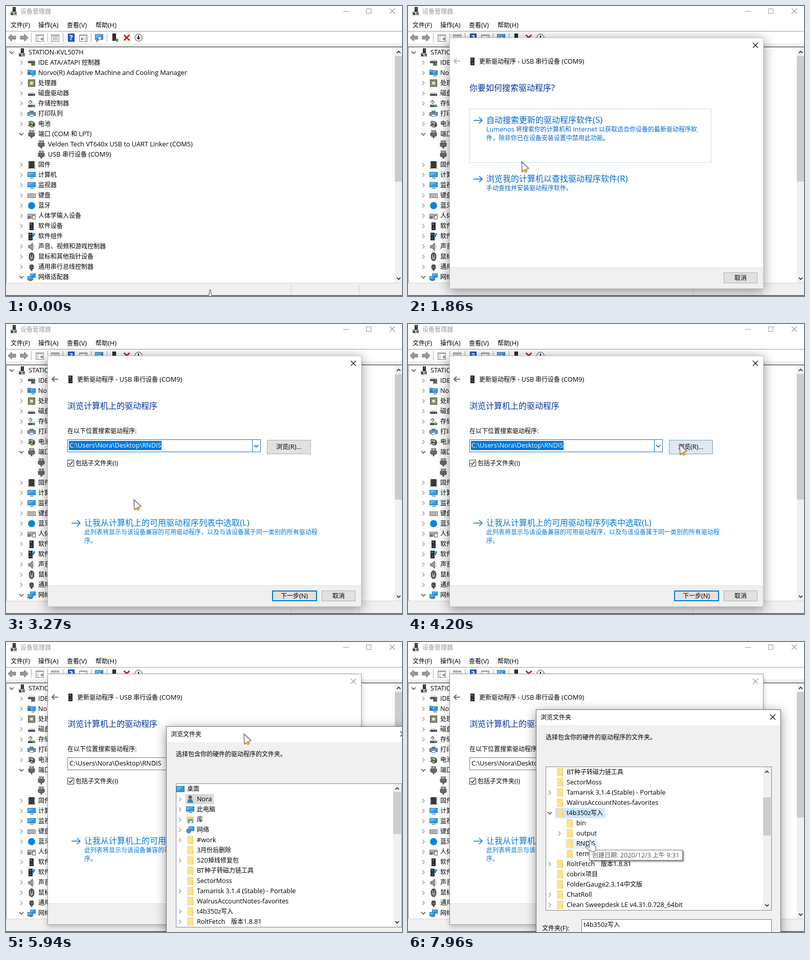
These frames come from a looping animation (774 px wide and 568 px high, 8000 ms). An HTML page with a canvas:

```html
<!DOCTYPE html>
<html lang="zh-CN">
<head>
<meta charset="utf-8">
<title>设备管理器</title>
<style>
html, body { margin: 0; width: 774px; height: 568px; overflow: hidden; background: #f0f0f0; }
canvas { display: block; }
</style>
</head>
<body>
<canvas id="c" width="774" height="568"></canvas>
<script>
const g = document.getElementById('c').getContext('2d');
const LOOP = 8000, STEP = 156.6, BLUE = '#0078d7';

// ---- drawing helpers ----
const R = (x, y, w, h, c) => { g.fillStyle = c; g.fillRect(x, y, w, h); };
const box = (x, y, w, h, fill, line) => { R(x, y, w, h, line); R(x + 1, y + 1, w - 2, h - 2, fill); };
function trace(pts) {
  g.beginPath();
  pts.forEach(([x, y], i) => i ? g.lineTo(x, y) : g.moveTo(x, y));
}
function L(pts, c, w = 1) { trace(pts); g.strokeStyle = c; g.lineWidth = w; g.stroke(); }
function P(pts, fill, line, w = 1) {
  trace(pts); g.closePath();
  g.fillStyle = fill; g.fill();
  if (line) { g.strokeStyle = line; g.lineWidth = w; g.lineJoin = 'round'; g.stroke(); }
}
function disc(x, y, r, fill, line) {
  g.beginPath(); g.arc(x, y, r, 0, 7);
  g.fillStyle = fill; g.fill();
  if (line) { g.strokeStyle = line; g.lineWidth = 1; g.stroke(); }
}
function panel(x, y, w, h, fill, line, blur, alpha, off) {
  g.save();
  g.shadowColor = `rgba(0,0,0,${alpha})`; g.shadowBlur = blur;
  g.shadowOffsetX = off; g.shadowOffsetY = off || 4;
  R(x, y, w, h, line);
  g.restore();
  R(x + 1, y + 1, w - 2, h - 2, fill);
}
// Latin runs are set a little larger than the CJK runs beside them
function run(s, size, bold, each) {
  let w = 0;
  for (const part of s.match(/[\u3000-\uffef]+|[^\u3000-\uffef]+/g)) {
    const px = part.charCodeAt(0) >= 0x3000 ? size : size * 1.06;
    g.font = `${bold ? 'bold ' : ''}${px}px "Open Sans","Noto Sans CJK SC","Noto Sans CJK",sans-serif`;
    if (each) each(part, w);
    w += g.measureText(part).width;
  }
  return w;
}
function T(s, x, y, c = '#000', size = 12, bold = false) {
  const base = Math.round(y + size * .36);
  run(s, size, bold, (part, dx) => { g.fillStyle = c; g.fillText(part, Math.round(x + dx), base); });
}
const width = s => run(s, 12, false);
const mid = (s, x, y) => T(s, x - width(s) / 2, y);
function chevron(x, y, open, c) {
  if (open) L([[x - 4, y - 2], [x, y + 2], [x + 4, y - 2]], c || '#404040', 1.5);
  else L([[x - 2, y - 4], [x + 2, y], [x - 2, y + 4]], c || '#9c9c9c', 1.4);
}
function cross(x, y, c, r = 5, w = 1.1) {
  L([[x - r, y - r], [x + r, y + r]], c, w);
  L([[x + r, y - r], [x - r, y + r]], c, w);
}
function arrow(x, y, len, c, w, head) {
  L([[x, y], [x + len, y]], c, w);
  L([[x + len - head, y - head], [x + len, y], [x + len - head, y + head]], c, w);
}
function scrollbar(x, y, h, top, len) {
  R(x, y, 16, h, '#f0f0f0');
  L([[x + 4, y + 11], [x + 7.5, y + 7.5], [x + 11, y + 11]], '#404040', 1.8);
  L([[x + 4, y + h - 11], [x + 7.5, y + h - 7.5], [x + 11, y + h - 11]], '#404040', 1.8);
  R(x, Math.round(top), 15, Math.round(len), '#cdcdcd');
}

// ---- icons, drawn around 0,0 ----
const screen = (x, y, w, h) => {
  box(x, y, w, h, '#2f9be8', '#2874b0');
  P([[x + 1, y + 1], [x + w - 2, y + 1], [x + 1, y + h - 2]], '#5bb8f5');
};
const plug = (s, c) => {
  box(-5 * s, -8 * s, 10 * s, 6 * s, '#c4c4c4', '#777');
  R(-3 * s, -6 * s, 2, 2, '#444'); R(1.4 * s, -6 * s, 2, 2, '#444');
  P([[-6.5 * s, -3], [6.5 * s, -3], [6.5 * s, 3], [4 * s, 5], [-4 * s, 5], [-6.5 * s, 3]], c);
  for (const x of [-3, 0, 3]) R(x * s - .5, -1, 1, 4, '#8d8d8d');
  R(-1.5, 5, 3, 3, '#555');
};
const drive = y => {
  P([[-5, y], [5, y], [7, y + 3], [-7, y + 3]], '#d0d3d6');
  R(-7, y + 3, 14, 4, '#4c5054'); R(3, y + 5, 2, 1, '#7fdc6a');
};
const tower = () => { box(-4, -7, 8, 15, '#303438', '#1c1e20'); R(-2, -5, 2, 2, '#6ec46a'); R(-2, 4, 4, 1, '#777'); };
const icons = {
  pc() {
    box(-2, -8, 6, 10, '#3a3c3e', '#1a1a1a'); R(0, -6, 2, 1, '#8ccf7c');
    box(-6, 1, 12, 7, '#d4d6d8', '#777'); R(-5, 3, 4, 4, '#444'); R(1, 3, 4, 3, '#555');
  },
  ide() { drive(-6); R(-1, 1, 8, 5, '#5c8a56'); R(1, 2, 3, 2, '#2d4a2a'); },
  system() { screen(-4, -5, 12, 9); R(-8, -6, 6, 10, '#3b78b8'); R(-7, -4, 4, 1, '#bfe0ff'); R(0, 5, 6, 2, '#889'); },
  cpu() { box(-7, -7, 14, 14, '#8aa06a', '#39432c'); box(-4, -4, 8, 8, '#e5e0c6', '#646a4d'); },
  disk() { drive(-2); },
  store() { drive(0); L([[-6, -2], [-2, -6], [1, -3], [-3, 0]], '#666', 1.5); R(1, 3, 6, 4, '#5c8a56'); },
  printer() { R(-4, -6, 8, 5, '#4a8ec8'); box(-8, -3, 16, 7, '#89939c', '#4d565e'); box(-4, 1, 8, 5, '#fff', '#4a8ec8'); },
  battery() { disc(1, 1, 6, '#565b50'); R(-6, -6, 8, 5, '#7e8877'); R(-2, -3, 5, 8, '#a9b59a'); L([[-7, 4], [-2, 0], [6, 4]], '#333', 1.5); },
  port() { plug(1, '#5a5a5a'); },
  chip() {
    box(-5, -7, 10, 14, '#3a3a3a', '#222');
    for (let y = -6; y < 7; y += 3) { R(-7, y, 2, 1.5, '#555'); R(5, y, 2, 1.5, '#555'); }
  },
  monitor() { screen(-8, -6, 16, 10); R(-3, 5, 7, 2, '#8a97a3'); },
  keys() {
    box(-8, -4, 16, 9, '#d5d5d5', '#6d6d6d');
    for (let y = -2; y < 3; y += 2) for (let x = -6; x < 6; x += 2) R(x, y, 1, 1, '#444');
  },
  dot() { disc(0, 0, 7, '#0a84dc'); },
  hid() { icons.keys(); R(-8, 0, 6, 6, '#777'); box(1, -1, 7, 8, '#ededed', '#666'); },
  tower,
  part() { g.save(); g.translate(-2, 0); tower(); g.restore(); R(3, -6, 4, 4, '#3a96dd'); R(1, -3, 4, 4, '#2874b0'); },
  sound() { P([[-6, -2], [-3, -2], [2, -7], [2, 8], [-3, 3], [-6, 3]], '#999', '#555'); L([[4, -4], [5, 0], [4, 5]], '#aaa'); },
  mouse() { g.beginPath(); g.ellipse(0, 0, 4.5, 7.5, 0, 0, 7); g.fillStyle = '#9a9a9a'; g.fill(); g.strokeStyle = '#222'; g.lineWidth = 1.6; g.stroke(); R(-.7, -6, 1.5, 6, '#222'); },
  usb() { plug(.65, '#3f3f3f'); },
  net() { screen(-3, -7, 11, 8); screen(-8, -2, 11, 8); R(-5, 6, 6, 1.5, '#667'); },
  desk() { screen(-8, -6, 16, 12); },
  user() { disc(0, -4, 3.5, '#6b5a48'); P([[-6, 7], [-4, 0], [4, 0], [6, 7]], '#3f7fae'); },
  lib() { R(-7, -6, 14, 12, '#f4cf67'); R(-4, -1, 9, 8, '#3f9ad8'); R(-1, 2, 4, 5, '#fff'); },
  globe() { screen(-3, -7, 11, 9); disc(-3, 2, 5, '#4a93c8'); },
  folder() { R(-6, -8, 12, 16, '#f0cf70'); R(-6, -7, 11, 15, '#fde28f'); R(5, -1, 1, 9, '#e0b850'); },
};
function icon(name, x, y) { g.save(); g.translate(x, y); icons[name](); g.restore(); }

// ---- contents ----
const tree = [
  [0, 'STATION-KVL507H', 'pc', 1], [1, 'IDE ATA/ATAPI 控制器', 'ide'],
  [1, 'Norvo(R) Adaptive Machine and Cooling Manager', 'system'],
  [1, '处理器', 'cpu'], [1, '磁盘驱动器', 'disk'], [1, '存储控制器', 'store'], [1, '打印队列', 'printer'],
  [1, '电池', 'battery'], [1, '端口 (COM 和 LPT)', 'port', 1],
  [2, 'Velden Tech VT640x USB to UART Linker (COM5)', 'port'], [2, 'USB 串行设备 (COM9)', 'port'],
  [1, '固件', 'chip'], [1, '计算机', 'monitor'], [1, '监视器', 'monitor'], [1, '键盘', 'keys'], [1, '蓝牙', 'dot'],
  [1, '人体学输入设备', 'hid'], [1, '软件设备', 'tower'], [1, '软件组件', 'part'], [1, '声音、视频和游戏控制器', 'sound'],
  [1, '鼠标和其他指针设备', 'mouse'], [1, '通用串行总线控制器', 'usb'], [1, '网络适配器', 'net', 1],
];
// a leading + marks an entry with children
const dir = s => [1, s.replace(/^\+/, ''), 'folder', s[0] === '+'];
const tail = ['+Clean Sweepdesk LE v4.31.0.728_64bit', '+kp-5300摇杆for7 8 10 程序', 'qpull'];
const folders = [
  [0, '桌面', 'desk'], [1, 'Nora', 'user', true], [1, '此电脑', 'monitor', true], [1, '库', 'lib', true], [1, '网络', 'globe', true],
  ...['+#work', '3月份后删除', '+520掉线修复包', 'BT种子转磁力链工具', 'SectorMoss', '+Tamarisk 3.1.4 (Stable) - Portable',
    'WalrusAccountNotes-favorites', '+t4b350z写入', '+RoltFetch　版本1.8.81', 'cobrix项目', 'FolderGauge2.3.14中文版',
    '+ChatRoll', ...tail, ...tail].map(dir),
];
const PICK = 12;
const inner = [[2, 'bin', 'folder'], [2, 'output', 'folder', true], [2, 'RNDIS', 'folder'], [2, 'term', 'folder']];
const opened = [...folders.slice(0, PICK + 1), ...inner, ...folders.slice(PICK + 1)];

// ---- timing ----
const path = [
  [0, 399, 556], [900, 169, 296], [1070, 176, 298], [1380, 222, 305], [2000, 222, 305], [2630, 250, 344],
  [3260, 250, 344], [4040, 531, 236], [4510, 531, 236], [5290, 465, 180], [5930, 465, 180], [6230, 402, 147],
  [6540, 353, 322], [7020, 353, 322], [7180, 353, 328], [7800, 354, 375], [7960, 355, 389],
];
function along(t) {
  let i = 1;
  while (i < path.length - 1 && path[i][0] < t) i++;
  const [a, x, y] = path[i - 1], [b, u, v] = path[i];
  let k = Math.min(1, Math.max(0, (t - a) / (b - a)));
  k = k * k * (3 - 2 * k);
  return [Math.round(x + (u - x) * k), Math.round(y + (v - y) * k)];
}
const topRow = t => t < 6500 ? 0 : t < 6650 ? 3 : t < 6800 ? 6 : t < 7100 ? 9 : 8;

// ---- parts of the scene ----
function toolbar() {
  for (const [x, d] of [[12, -1], [35, 1]])
    P([[x + 8 * d, 62], [x + d, 55], [x + d, 59], [x - 7 * d, 59], [x - 7 * d, 65], [x + d, 65], [x + d, 69]], '#9b9b9b', '#6e6e6e');
  for (const x of [49, 81, 111, 166, 197]) R(x, 53, 1, 18, '#a8a8a8');
  for (const x of [66, 96, 151]) { box(x - 8, 56, 16, 14, '#fff', '#858585'); R(x - 7, 57, 14, 2, '#b8b8b8'); }
  R(60, 60, 4, 9, '#ddd'); P([[72, 61], [72, 68], [67, 64.5]], '#4ca64c');
  for (let y = 60; y < 68; y += 2) R(91, y, 10, 1, '#999');
  R(153, 60, 5, 9, '#ddd'); P([[147, 61], [147, 68], [152, 64.5]], '#4ca64c');
  box(121, 54, 13, 16, '#2a5fc0', '#1c4590'); T('?', 124, 62, '#fff', 13, true);
  screen(174, 55, 16, 11); disc(183, 63, 3.5, '#d8f0ff', '#557'); L([[180, 66], [176, 70]], '#555', 2);
  box(208, 54, 7, 14, '#333', '#111'); P([[213, 67], [217, 63], [221, 67]], '#3fa34a'); R(215, 67, 4, 3, '#3fa34a');
  cross(236, 62, '#c02314', 5.5, 2.8);
  disc(259, 62, 7, '#fff', '#333'); R(258, 58, 2, 4, '#111'); P([[255, 62], [263, 62], [259, 66]], '#111');
}
function manager(active, selected, status) {
  R(0, 0, 774, 568, '#fff');
  const ink = active ? '#000' : '#999';
  icon('pc', 15, 10);
  T('设备管理器', 28, 11, ink);
  R(659, 10, 11, 1, ink);
  g.strokeStyle = ink; g.lineWidth = 1; g.strokeRect(704.5, 5.5, 9, 9);
  cross(755, 10, ink);
  [['文件(F)', 9], ['操作(A)', 63], ['查看(V)', 119], ['帮助(H)', 175]].forEach(([s, x]) => T(s, x, 38));
  R(0, 49, 774, 1, '#a0a0a0');
  toolbar();
  R(0, 73, 774, 6, '#f0f0f0');
  R(0, 79, 774, 1, '#a0a0a0'); R(0, 80, 774, 1, '#696969'); R(0, 80, 1, 463, '#828790');
  tree.forEach(([lv, s, ic, open], i) => {
    const x = [44, 63, 82][lv], y = 91 + i * 20;
    if (selected && i === 10) R(59, 281, 152, 19, '#cce8ff');
    if (lv < 2) chevron(lv ? 30 : 11, y, open);
    icon(ic, x - 13, y);
    T(s, x, y);
  });
  scrollbar(760, 81, 462, 98, 246);
  R(0, 542, 774, 26, '#f0f0f0'); R(0, 542, 774, 1, '#d5d5d5');
  R(557, 546, 1, 19, '#d2d2d2'); R(690, 546, 1, 19, '#d2d2d2');
  if (status) T('启动所选设备的更新驱动程序向导。', 1, 556);
  R(0, 566, 774, 1, '#a9a6a6'); R(0, 567, 774, 1, '#474242');
}
function menu(hot) {
  panel(169, 297, 203, 131, '#f0f0f0', '#a5a5a5', 3, .5, 2);
  if (hot) R(172, 300, 197, 22, '#91c9f7');
  [['更新驱动程序(P)', 311], ['禁用设备(D)', 333], ['卸载设备(U)', 355], ['扫描检测硬件改动(A)', 384]].forEach(([s, y]) => T(s, 204, y));
  T('属性(R)', 204, 413, '#000', 12, true);
  R(199, 369, 169, 1, '#c8c8c8'); R(199, 398, 169, 1, '#c8c8c8');
}
function button(s, x, y, w, h, fill = '#e1e1e1', line = '#adadad', thick) {
  box(x, y, w, h, fill, line);
  if (thick) box(x + 1, y + 1, w - 2, h - 2, fill, line);
  mid(s, x + w / 2, y + h / 2);
}
function link(title, lines, y, c) {
  arrow(128, y + 1, 17, c, 1.5, 6);
  T(title, 153, y, c, 16);
  lines.forEach((s, i) => T(s, 153, y + 19 + i * 17, c));
}
function wizard(t, page, active, mx, my) {
  panel(81, 62, 614, 492, '#fff', active ? '#c4c4c4' : '#9b9b9b', active ? 22 : 10, active ? .42 : .22, 0);
  cross(679, 77, active ? '#000' : '#999');
  const back = page ? '#666' : '#b4b4b4';
  L([[90, 108], [102, 108]], back, 1.8); L([[95, 103], [90, 108], [95, 113]], back, 1.8);
  icon('tower', 126, 108);
  T('更新驱动程序 - USB 串行设备 (COM9)', 139, 109);
  R(82, 512, 612, 41, '#f0f0f0'); R(82, 512, 612, 1, '#dfdfdf');
  button('取消', 617, 522, 66, 21);
  if (!page) {
    T('你要如何搜索驱动程序?', 120, 160, '#003399', 16);
    const hot = mx > 120 && mx < 593 && my > 316 && my < 405;
    box(120, 201, 473, 106, '#fff', '#c6dfea');
    if (hot) box(120, 316, 473, 89, '#fff', '#dedede');
    link('自动搜索更新的驱动程序软件(S)', ['Lumenos 将搜索你的计算机和 Internet 以获取适合你设备的最新驱动程序软', '件，除非你已在设备安装设置中禁用此功能。'], 223, '#0066cc');
    link('浏览我的计算机以查找驱动程序软件(R)', ['手动查找并安装驱动程序软件。'], 338, hot ? '#0a4fd6' : '#0066cc');
    return;
  }
  const focus = t < 4300, hot = mx > 510 && mx < 596 && my > 227 && my < 255;
  T('浏览计算机上的驱动程序', 120, 160, '#003399', 16);
  T('在以下位置搜索驱动程序:', 120, 210);
  box(120, 226, 378, 25, '#fff', focus ? BLUE : '#7a7a7a');
  const place = 'C:\\Users\\Nora\\Desktop\\RNDIS';
  if (focus) { R(123, 229, Math.round(width(place)) + 2, 18, BLUE); R(481, 227, 1, 23, BLUE); }
  T(place, 124, 238, focus ? '#fff' : '#000');
  chevron(489, 239, true);
  if (focus) button('浏览(R)...', 510, 227, 86, 28, hot ? '#dfe7ef' : '#e1e1e1', hot ? '#7b9fc0' : '#adadad');
  else button('浏览(R)...', 510, 227, 86, 28, '#e1e1e1', BLUE, true);
  box(120, 266, 13, 13, '#fff', '#333');
  L([[122.5, 272.5], [125.5, 275.5], [130.5, 269]], '#222', 1.4);
  T('包括子文件夹(I)', 136, 273);
  link('让我从计算机上的可用驱动程序列表中选取(L)', ['此列表将显示与该设备兼容的可用驱动程序，以及与该设备属于同一类别的所有驱动程', '序。'], 389, BLUE);
  button('下一步(N)', 520, 522, 88, 21, '#e1e1e1', focus ? BLUE : '#adadad', focus);
}
function chooser(t, mx, my) {
  const [dx, dy] = t < 5930 ? [0, 0] : t > 6230 ? [-63, -33] : [mx - 465, my - 180];
  const X = 314 + dx, Y = 165 + dy, open = t > 7100;
  const list = open ? opened : folders, total = open ? 46 : 42;
  const top = topRow(t), lag = open ? top : topRow(t - STEP);
  panel(X - 1, Y, 479, 500, '#f0f0f0', '#6a6a6a', 20, .42, 0);
  R(X, Y + 1, 477, 30, '#fff');
  T('浏览文件夹', X + 8, Y + 16);
  cross(X + 462, Y + 15, '#000');
  T('选择包含你的硬件的驱动程序的文件夹。', X + 18, Y + 55);
  box(X + 18, Y + 112, 442, 282, '#fff', '#828790');
  // hover and thumb trail the scroll by one step
  const over = t > 6400 ? lag + Math.floor((my - Y - 113) / 20) : -1;
  list.slice(top, top + 14).forEach(([lv, s, ic, kids], i) => {
    const id = i + top, x = X + [40, 59, 78][lv], y = Y + 123 + i * 20;
    const sel = id === (open ? PICK : 1);
    if (sel || id === over) R(x - 22, y - 10, width(s) + 26, 20, sel ? (open ? '#cce8ff' : '#d9d9d9') : '#e5f3ff');
    if (kids) chevron(x - 33, y, open && id === PICK);
    icon(ic, x - 13, y);
    T(s, x, y);
  });
  scrollbar(X + 443, Y + 113, 280, Y + 129 + lag / total * 245, 14 / total * 245);
  T('文件夹(F):', X + 11, Y + 429);
  box(X + 88, Y + 411, 372, 27, '#fff', '#7a7a7a');
  T(open ? folders[PICK][1] : 'Nora', X + 92, Y + 422);
}
function tip(s, x, y) {
  panel(x, y, Math.round(width(s)) + 12, 21, '#fff', '#767676', 3, .5, 2);
  T(s, x + 6, y + 11, '#575757');
}
function pointer(kind, x, y) {
  g.save(); g.translate(x, y);
  if (kind === 'peak') P([[-.8, 0], [.8, 0], [3.5, 14], [-3, 14]], '#eee', '#777', 1.3);
  else if (kind === 'hand') P([[-1, 0], [2, 0], [4, 8], [10, 9], [12, 13], [12, 19], [8, 22], [1, 20], [-8, 13], [-7, 11], [0, 13]], '#fff', '#8b8b8b', 1.4);
  else {
    P([[0, 0], [14, 13], [8, 15], [1, 20]], '#fff', '#857d8c', 1.8);
    disc(8, 18, 3.4, '#dba936');
  }
  g.restore();
}

function draw(ms) {
  const tick = ms < 130 ? 0 : 1 + Math.floor((ms - 124) / STEP);
  const t = tick ? 130 + (tick - 1) * STEP : 0;
  const [x, y] = along(t);
  const active = t > 850 && t < 1800;
  manager(active, active, t > 1200 && t < 1500);
  if (t > 850 && t < 1500) menu(t > 1200);
  if (t > 1800) wizard(t, t > 2900 ? 1 : 0, t < 4600, x, y);
  if (t > 4600) chooser(t, x, y);
  if (t > 6800 && t < 7000) tip('创建日期: 2020/11/20 下午 6:51', 353, 344);
  if (t > 7900) tip('创建日期: 2020/12/3 上午 9:31', 354, 407);
  pointer(t < 100 ? 'peak' : t > 6400 ? 'hand' : 'arrow', x, y);
}
const start = performance.now();
function frame(now) {
  draw(Math.max(0, now - start) % LOOP);
  requestAnimationFrame(frame);
}
draw(0);
requestAnimationFrame(frame);
</script>
</body>
</html>
```
